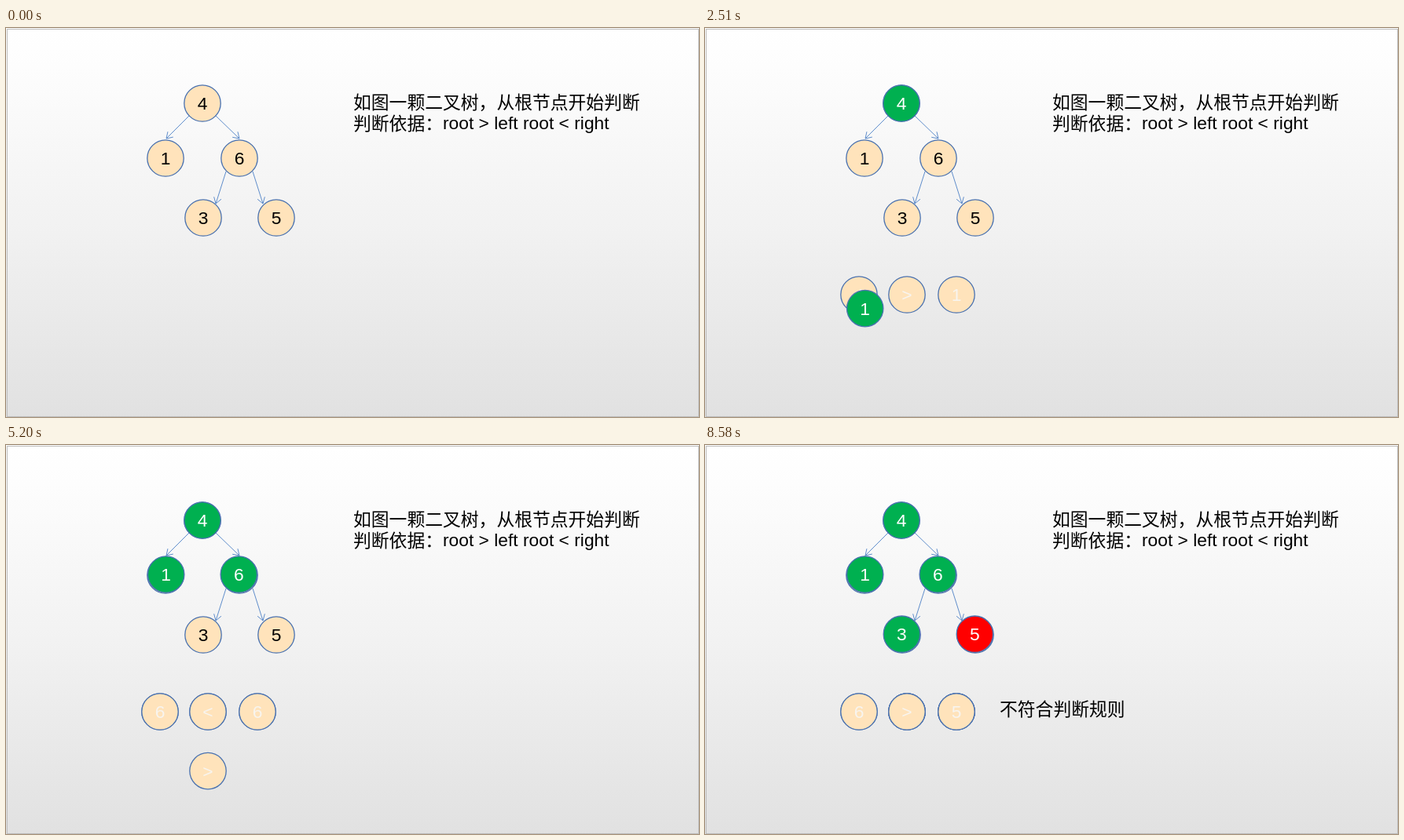
An HTML page with a canvas that plays this animation: 882x496 px, repeating every 8880 ms.

```html
<!DOCTYPE html>
<html lang="zh-CN">
<head>
<meta charset="utf-8">
<style>
html, body { margin: 0; width: 100%; height: 100%; overflow: hidden; background: #fff; }
canvas { display: block; }
</style>
</head>
<body>
<canvas id="stage" width="882" height="496"></canvas>
<script>
const ctx = document.getElementById('stage').getContext('2d');
const LOOP = 8880;
const LATIN = '22.8px "Liberation Sans", Arial, sans-serif';
const HAN = '22.8px "Noto Sans CJK SC", "Noto Sans CJK", sans-serif';
const STYLES = {
  plain: { fill: '#ffe3bb', text: '#000' },
  pale: { fill: '#ffe3bb', text: '#f8f4ee' },
  good: { fill: '#00b050', text: '#fff' },
  bad: { fill: '#ff0000', text: '#fff' }
};
const PALE_SPEED = 44.7; // pixels per step

const nodes = [['4', 250, 96], ['1', 203, 166], ['6', 297, 166], ['3', 251, 242], ['5', 344, 242]];
const arrows = [[233, 112, 204, 141], [267, 112, 297, 141], [280, 183, 267, 224], [314, 183, 327, 224]];

// start, end, steps, label, x, rest y, first y, style
const moves = [
  [250, 550, 5, '4', 196, 340, 495, 'pale'],
  [800, 1100, 5, '>', 257, 340, 488, 'pale'],
  [1330, 1640, 5, '1', 320, 340, 486, 'pale'],
  [1720, 2190, 7, '4', 250, 96, 488, 'good'],
  [2340, 2730, 6, '1', 203.7, 165, 486, 'good'],
  [2960, 3270, 5, '<', 257, 340, 488, 'pale'],
  [3500, 3800, 5, '6', 320, 340, 486, 'pale'],
  [3970, 4350, 6, '6', 296.3, 165, 441, 'good'],
  [4580, 4820, 4, '6', 196, 340, 474, 'pale'],
  [5050, 5350, 5, '>', 257, 340, 505, 'pale'],
  [5580, 5890, 5, '3', 320, 340, 492, 'pale'],
  [6120, 6430, 5, '3', 250.4, 241.2, 460, 'good'],
  [6660, 6970, 5, '>', 257, 340, 492, 'pale'],
  [7200, 7510, 5, '5', 320, 340, 489, 'pale'],
  [7740, 8050, 5, '不符合判断规则', 375, 345, 489, 'caption'],
  [8200, 8580, 6, '5', 343.4, 241.2, 496, 'bad']
];

function write(text, x, y, font, color = '#000', align = 'left') {
  ctx.font = font;
  ctx.fillStyle = color;
  ctx.textAlign = align;
  ctx.fillText(text, x, y);
}

function circle(label, x, y, style) {
  const { fill, text } = STYLES[style];
  ctx.beginPath();
  ctx.arc(x, y, 23.2, 0, Math.PI * 2);
  ctx.fillStyle = fill;
  ctx.fill();
  ctx.strokeStyle = '#4a72b0';
  ctx.lineWidth = 1.3;
  ctx.stroke();
  write(label, x, y + 8, LATIN, text, 'center');
}

function arrow([x1, y1, x2, y2]) {
  const back = Math.atan2(y1 - y2, x1 - x2);
  ctx.beginPath();
  ctx.moveTo(x1, y1);
  ctx.lineTo(x2, y2);
  for (const turn of [-0.57, 0.57]) {
    ctx.moveTo(x2, y2);
    ctx.lineTo(x2 + 9 * Math.cos(back + turn), y2 + 9 * Math.sin(back + turn));
  }
  ctx.strokeStyle = '#5f8dcb';
  ctx.lineWidth = 1;
  ctx.stroke();
}

function background() {
  const shade = ctx.createLinearGradient(0, 0, 0, 496);
  shade.addColorStop(0, '#ffffff');
  shade.addColorStop(0.1, '#fdfdfd');
  shade.addColorStop(0.5, '#f2f2f2');
  shade.addColorStop(1, '#e1e1e1');
  ctx.fillStyle = shade;
  ctx.fillRect(0, 0, 882, 496);
  ctx.strokeStyle = '#bdbdbd';
  ctx.lineWidth = 1;
  ctx.strokeRect(1.5, 1.5, 880, 494);
}

function cursor(x, y) {
  ctx.beginPath();
  ctx.moveTo(x, y);
  ctx.lineTo(x, y + 17);
  ctx.lineTo(x + 12, y + 12);
  ctx.closePath();
  ctx.fillStyle = '#fff';
  ctx.fill();
  ctx.strokeStyle = '#000';
  ctx.lineWidth = 1;
  ctx.stroke();
}

// The number of the last step reached; steps fall on 10 ms marks.
function stepAt(t, start, end, steps) {
  let step = 0;
  while (step < steps - 1) {
    const next = start + (step + 1) * (end - start) / (steps - 1);
    if (t < Math.floor(next / 10) * 10) break;
    step++;
  }
  return step;
}

function drawMove(t, [start, end, steps, label, x, restY, firstY, style]) {
  if (t < start) return;
  const step = stepAt(t, start, end, steps);
  const even = (firstY - restY) / (steps - 1);
  const speed = style === 'good' || style === 'bad' ? even : PALE_SPEED;
  const y = step === steps - 1 ? restY : Math.max(restY, firstY - speed * step);
  if (style === 'caption') write(label, x, y, HAN);
  else circle(label, x, y, style);
}

function draw(t) {
  background();
  write('如图一颗二叉树，从根节点开始判断', 442, 102.5, HAN);
  write('判断依据：', 442, 129.5, HAN);
  write('root > left root < right', 556, 129, LATIN);
  for (const [label, x, y] of nodes) circle(label, x, y, 'plain');
  arrows.forEach(arrow);
  for (const move of moves) drawMove(t, move);
  if (t >= 7270 && t < 7510) cursor(149.5, 486.5);
}

function tick() {
  draw(performance.now() % LOOP);
  requestAnimationFrame(tick);
}
tick();
</script>
</body>
</html>
```
